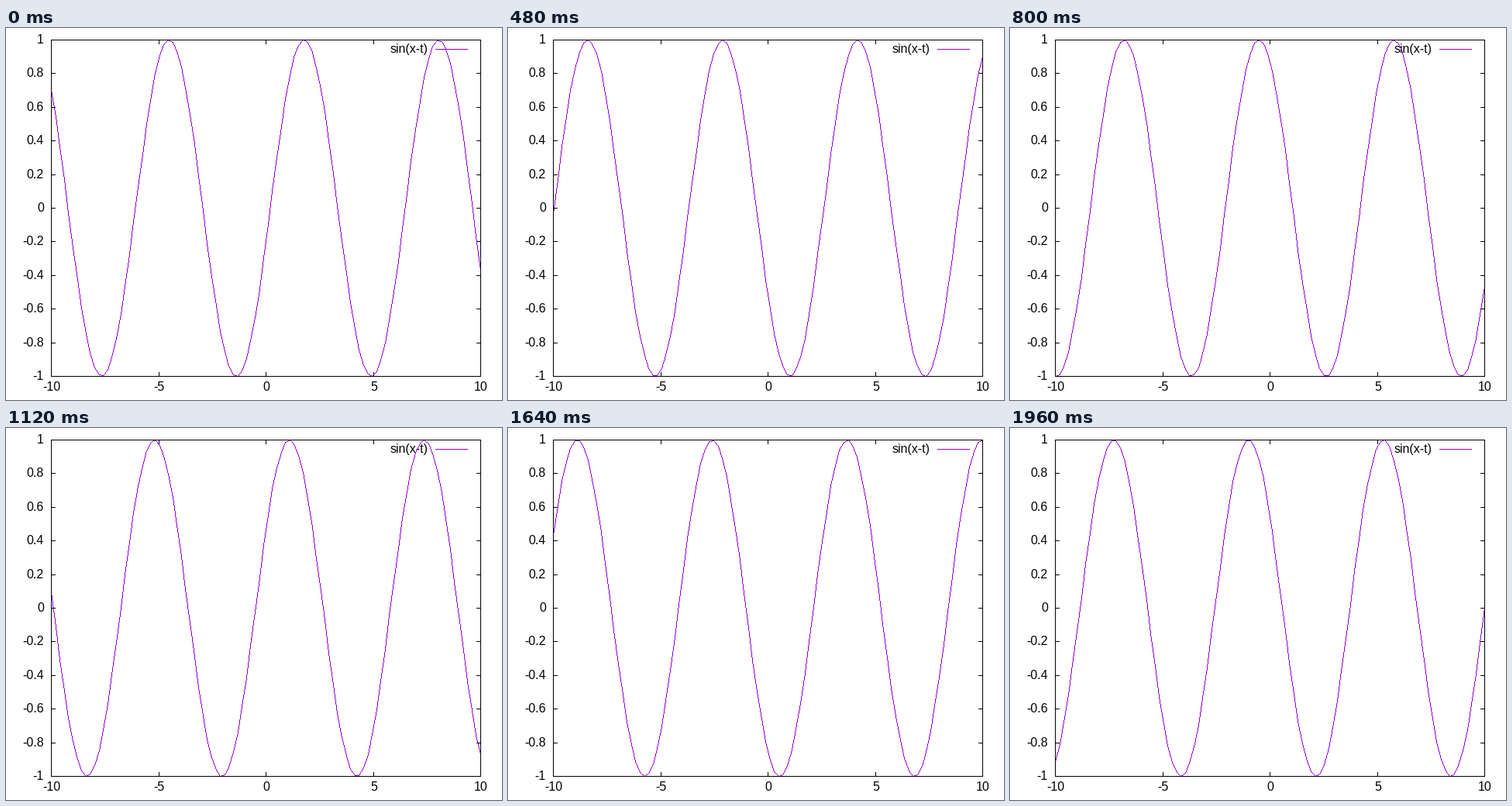
Recreate the animation shown at these times as a matplotlib script. Size 640 by 480 pixels, loop 2 s.

```python
import numpy as np
import matplotlib.pyplot as plt
from matplotlib.animation import FuncAnimation

plt.rcParams.update({
    "font.family": "Liberation Sans",
    "font.size": 14.4,
    "text.hinting": "native",
})

W, H, DPI = 640, 480, 80
LEFT, RIGHT, TOP, BOTTOM = 58, 612, 15, 449
TIC = 5
FRAMES, STEP = 50, 0.2
PURPLE = "#9400d3"

fig = plt.figure(figsize=(W / DPI, H / DPI), dpi=DPI, facecolor="white")
ax = fig.add_axes([0, 0, 1, 1])
ax.set(xlim=(0, W), ylim=(H - 1, -1))
ax.axis("off")


def nearest(v):
    return np.floor(np.asarray(v) + 0.5)


def col(x):
    return nearest(LEFT + (x + 10) / 20 * (RIGHT - LEFT))


def row(y):
    return H - 1 - nearest(H - 1 - BOTTOM + (y + 1) / 2 * (BOTTOM - TOP))


def trace(xs, ys):
    """Pixels of a crisp one-pixel polyline."""
    px, py = [], []
    for x0, y0, x1, y1 in zip(xs, ys, xs[1:], ys[1:]):
        n = int(max(abs(x1 - x0), abs(y1 - y0))) + 1
        px.append(np.linspace(x0, x1, n))
        py.append(np.linspace(y0, y1, n))
    return nearest(np.concatenate(px)), nearest(np.concatenate(py))


def line(xs, ys, color="black", z=4):
    return ax.plot(*trace(xs, ys), ",", color=color, zorder=z)[0]


def label(x, y, text, ha):
    ax.text(x, y + 4, text, ha=ha, va="baseline", color="black", zorder=2)


# Border, tics and their labels
line([LEFT, RIGHT, RIGHT, LEFT, LEFT], [TOP, TOP, BOTTOM, BOTTOM, TOP])

for v in range(-10, 11, 5):
    c = col(v)
    line([c, c], [BOTTOM, BOTTOM - TIC])
    line([c, c], [TOP, TOP + TIC])
    label(c + 0.5, BOTTOM + 14, str(v), "center")

for i in range(-5, 6):
    r = row(i / 5)
    line([LEFT, LEFT + TIC], [r, r])
    line([RIGHT, RIGHT - TIC], [r, r])
    label(49, r, f"{i / 5:g}", "right")

# Key
label(545, 27, "sin(x-t)", "right")
line([554, 595], [27, 27], PURPLE, 3)

# Curve
x = np.linspace(-10, 10, 100)
curve = line(col(x), row(np.sin(x)), PURPLE, 3)


def update(i):
    t = STEP * (i + 1)
    curve.set_data(*trace(col(x), row(np.sin(x - t))))
    return [curve]


anim = FuncAnimation(fig, update, frames=FRAMES, interval=40, repeat=True, repeat_delay=0)
plt.show()
```
